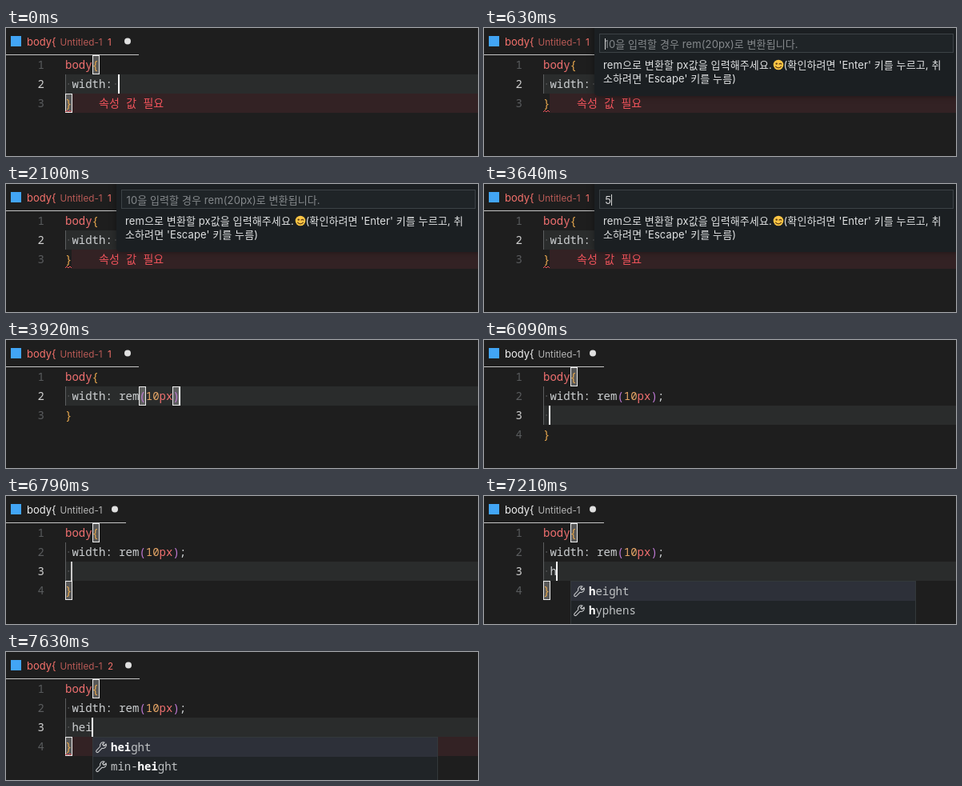
Animation, 590 px wide and 160 px high, one loop 8 s. Source, as an HTML page:

```html
<!DOCTYPE html>
<html lang="ko">
<head>
<meta charset="utf-8">
<title>px to rem</title>
<style>
  html, body { margin: 0; width: 100%; height: 100%; overflow: hidden; background: #1e1e1e; }
  svg { display: block; }
  text { white-space: pre; }
  .code { font: 14px "Noto Sans Mono", "Noto Sans CJK KR", "Noto Sans CJK", monospace; }
  .ui { font: 13px Inter, "Noto Sans CJK KR", "Noto Sans CJK", sans-serif; letter-spacing: .1px; }
  .tab { font: 13px Inter, sans-serif; }
  .small { font-size: 11.7px; }
  .bold { font-weight: 700; fill: #fff; }
</style>
</head>
<body>
<svg id="stage" width="590" height="160" viewBox="0 0 590 160"></svg>
<script>
const LOOP = 8000, STEP = 70, X0 = 74, CH = 8.4;
const C = {
  red: '#f07070', orange: '#e8a84e', text: '#cdd0d2', purple: '#bd78d2', num: '#e5a566',
  error: '#f2545c', dim: '#5a5c5e', active: '#2a2c2c', errorRow: '#332224'
};
const stage = document.getElementById('stage');
const timed = [];
const rowTop = row => 34 + 24 * (row - 1);
const col = n => X0 + CH * n;

// spans: pairs of start and end times; none means always visible
function add(tag, attrs, spans, parent = stage) {
  const node = document.createElementNS('http://www.w3.org/2000/svg', tag);
  for (const key in attrs) node.setAttribute(key, attrs[key]);
  parent.append(node);
  if (spans) timed.push({ node, spans });
  return node;
}
const rect = (x, y, width, height, fill, spans, parent) =>
  add('rect', { x, y, width, height, fill }, spans, parent);

function label(x, y, str, fill, cls, spans, parent) {
  const node = add('text', { x, y, fill, class: cls }, spans, parent);
  node.textContent = str;
  return node;
}
const code = (n, row, str, fill, spans) =>
  label(col(n), rowTop(row) + 17, str, fill, 'code', spans);

function bracketBox(n, row, spans) {
  add('rect', {
    x: Math.round(col(n)) + .5, y: rowTop(row) + .5, width: 8, height: 23,
    fill: 'rgba(160,160,160,.45)', stroke: '#ececec'
  }, spans);
}
function squiggle(row, spans) {
  const y = rowTop(row) + 23;
  add('path', { d: `M74 ${y}l2 -2 2 2 2 -2 2 2`, fill: 'none', stroke: C.error }, spans);
}

function tab(count, spans) {
  const g = add('g', {}, spans);
  const color = count ? '#f4716b' : '#f0f0f0';
  const end = count === 2 ? 167 : count ? 166 : 150;
  label(26, 21.5, 'body{', color, 'tab', null, g);
  label(67.5, 21.5, 'Untitled-1', color, 'tab small', null, g).setAttribute('opacity', .72);
  if (count) label(127, 21.5, count, color, 'tab small', null, g).setAttribute('font-weight', 600);
  add('circle', { cx: end - 14, cy: 16.5, r: 4, fill: '#e0e0e0' }, null, g);
  rect(0, 33, end, 1, '#c4c4c4', null, g);
}

function editor() {
  rect(6, 10, 13, 13, '#42a5f5');
  tab(1, [0, 3990]);
  tab(0, [3990, 7280]);
  tab(2, [7280, LOOP]);

  rect(74, 58, 516, 24, C.active, [0, 6090]);
  rect(74, 82, 516, 24, C.active, [6090, LOOP]);
  rect(82, 82, 508, 24, C.errorRow, [0, 3920]);
  rect(82, 106, 508, 24, C.errorRow, [7280, LOOP]);
  rect(74, 58, 1, 24, '#5c5e5f');
  rect(74, 82, 1, 24, '#5c5e5f', [6090, LOOP]);

  const lineNo = (row, on, spans) =>
    label(39.5, rowTop(row) + 17, row, on ? '#d0d0d0' : C.dim, 'code', spans);
  lineNo(1);
  lineNo(2, true, [0, 6090]);
  lineNo(2, false, [6090, LOOP]);
  lineNo(3, false, [0, 6090]);
  lineNo(3, true, [6090, LOOP]);
  lineNo(4, false, [6090, LOOP]);

  bracketBox(4, 1, [0, 560, 5460, LOOP]);
  bracketBox(0, 3, [0, 560, 5460, 6090]);
  bracketBox(0, 4, [6160, LOOP]);
  bracketBox(11, 2, [3920, 5390]);
  bracketBox(16, 2, [3920, 5390]);

  const inserted = [3850, LOOP];
  code(0, 1, 'body', C.red);
  code(4, 1, '{', C.orange);
  code(0, 2, '·', '#505253');
  code(1, 2, 'width:', C.text);
  code(7, 2, '·', '#505253', [0, 3850]);
  code(8, 2, 'rem', C.text, inserted);
  code(11, 2, '(', C.purple, inserted);
  code(12, 2, '10', C.num, inserted);
  code(14, 2, 'px', C.red, inserted);
  code(16, 2, ')', C.purple, inserted);
  code(17, 2, ';', C.text, [5390, LOOP]);
  code(0, 3, '·', '#505253', [6090, LOOP]);
  code(1, 3, 'h', C.text, [7140, LOOP]);
  code(2, 3, 'e', C.text, [7420, LOOP]);
  code(3, 3, 'i', C.text, [7560, LOOP]);
  code(0, 3, '}', C.orange, [0, 6090]);
  code(0, 4, '}', C.orange, [6090, LOOP]);
  squiggle(3, [0, 3920]);
  squiggle(4, [7280, LOOP]);
  code(5, 3, '속성 값 필요', C.error, [0, 3920]);
}

function prompt() {
  const g = add('g', {}, [560, 3850]);
  const panel = add('rect', { x: 138, y: -8, width: 460, height: 93, rx: 5, fill: '#1b1f22' }, null, g);
  panel.style.filter = 'drop-shadow(0 0 4px rgba(0,0,0,.4))';
  add('rect', { x: 144.5, y: 7.5, width: 442, height: 23, fill: '#1f2427', stroke: '#3c4246' }, null, g);
  label(150.5, 25, '10을 입력할 경우 rem(20px)로 변환됩니다.', '#85898c', 'ui', [560, 2660], g);
  label(151.3, 25, '5', '#d8d8d8', 'ui', [2660, 3850], g);
  rect(151, 13, 1, 14, '#d8d8d8', [630, 1120, 1610, 2100], g);
  rect(159, 13, 1, 14, '#d8d8d8', [2660, 3150, 3640, 3850], g);

  const msg = '#dfe1e2';
  label(149, 50.5, 'rem으로 변환할 px값을 입력해주세요.', msg, 'ui', null, g);
  label(374.5, 50.5, "(확인하려면 'Enter' 키를 누르고, 취", msg, 'ui', null, g);
  label(149, 68, "소하려면 'Escape' 키를 누름)", msg, 'ui', null, g);

  add('circle', { cx: 368, cy: 46, r: 6.3, fill: '#fbc545' }, null, g);
  add('circle', { cx: 365.7, cy: 44.6, r: 1.2, fill: '#5b3a14' }, null, g);
  add('path', {
    d: 'M369 45q1.4 -1.4 2.8 0M364.6 48.2q3.4 3.4 6.8 0',
    fill: 'none', stroke: '#5b3a14', 'stroke-width': 1.2, 'stroke-linecap': 'round'
  }, null, g);
}

function suggestions() {
  const g = add('g', {}, [7210, LOOP]);
  add('rect', { x: 108.5, y: 106.5, width: 431, height: 60, fill: '#202427', stroke: '#33383b' }, null, g);
  rect(109, 107, 430, 24, '#2d3039', null, g);
  for (const y of [119, 143]) {
    add('path', {
      d: 'M4 -6a4 4 0 0 0 -5.2 5L-6 4.2a1.5 1.5 0 0 0 2.1 2.1L1.2 1.2A4 4 0 0 0 6.2 -4L3.6 -1.5 1.6 -3.5z',
      transform: `translate(119 ${y})`, fill: 'none', stroke: '#c8cacc', 'stroke-width': 1.1,
      'stroke-linejoin': 'round'
    }, null, g);
  }
  const item = (y, before, match, after, spans) => {
    const node = label(131, y, '', '#c0c3c5', 'code', spans, g);
    for (const part of [before, match, after]) {
      add('tspan', part === match ? { class: 'bold' } : {}, null, node).textContent = part;
    }
  };
  item(124, '', 'h', 'eight', [7210, 7420]);
  item(148, '', 'h', 'yphens', [7210, 7420]);
  item(124, '', 'he', 'ight', [7420, 7560]);
  item(148, 'min-', 'he', 'ight', [7420, 7560]);
  item(124, '', 'hei', 'ght', [7560, LOOP]);
  item(148, 'min-', 'hei', 'ght', [7560, LOOP]);
}

editor();
suggestions();
const cursor = rect(0, 0, 2, 24, '#fff');
prompt();

// time, column, row
const moves = [[0, 8, 2], [3850, 17, 2], [5390, 18, 2], [6090, 1, 3], [7140, 2, 3], [7420, 3, 3], [7560, 4, 3]];
// time, steps, opacity before and after
const fades = [
  [0, 1, 1, 1], [280, 3, 1, 0], [3850, 1, 0, 1], [4480, 4, 1, 0],
  [5110, 3, 0, 1], [6790, 4, 1, 0], [7140, 1, 0, 1]
];
const latest = (list, t) => list.filter(e => e[0] <= t).pop();

function render(t) {
  for (const { node, spans } of timed) {
    const on = spans.some((s, i) => i % 2 === 0 && t >= s && t < spans[i + 1]);
    node.style.display = on ? '' : 'none';
  }
  const [, n, row] = latest(moves, t);
  const [start, steps, from, to] = latest(fades, t);
  const k = Math.min(1, (Math.floor((t - start) / STEP) + 1) / steps);
  cursor.setAttribute('x', Math.round(col(n)) - 1);
  cursor.setAttribute('y', rowTop(row));
  cursor.setAttribute('opacity', from + (to - from) * k);
}

const begin = performance.now();
function tick() {
  render((performance.now() - begin) % LOOP);
  requestAnimationFrame(tick);
}
tick();
</script>
</body>
</html>
```
